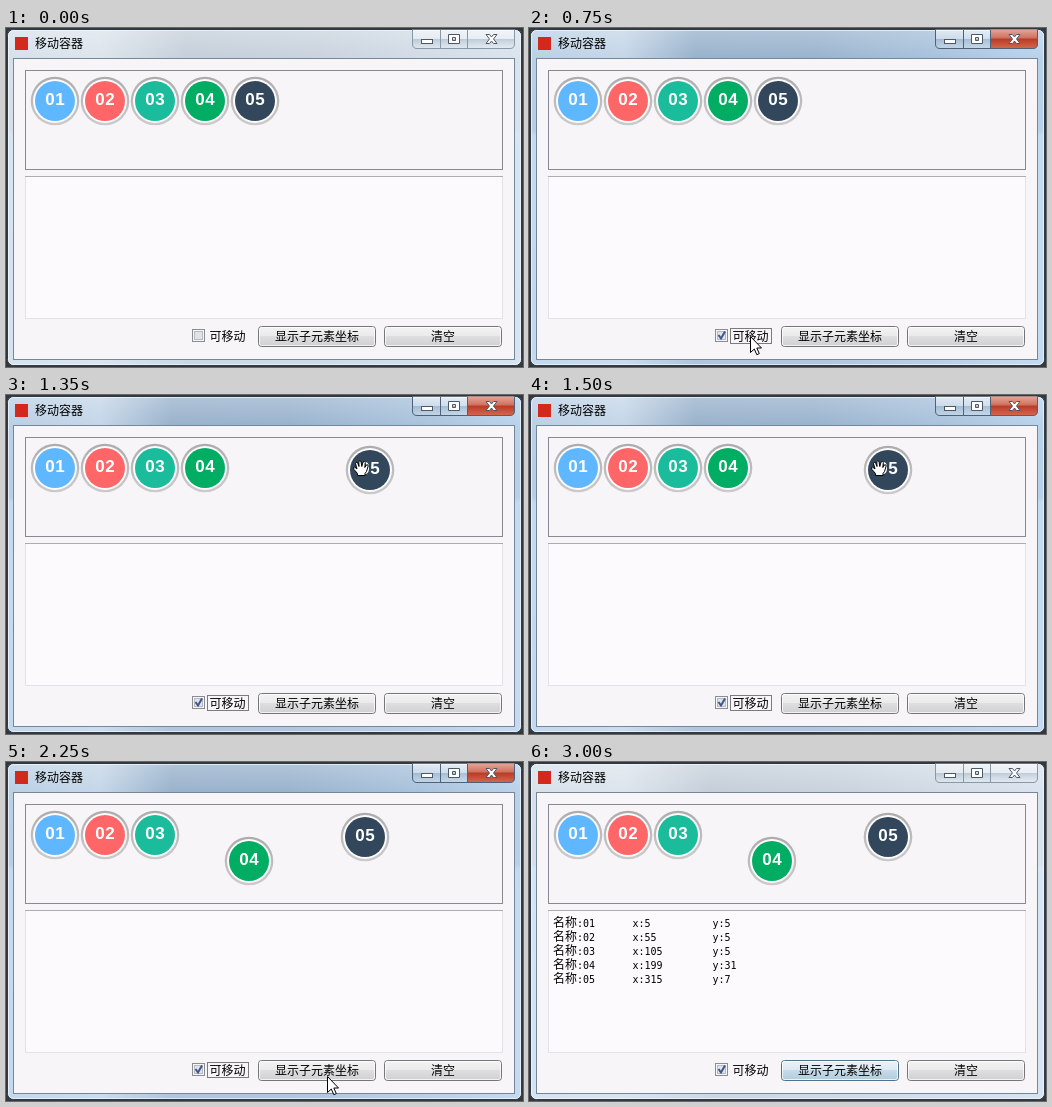
Animation, 517 px wide and 339 px high, one loop 3.15 s. Source, as an HTML page:

```html
<!DOCTYPE html>
<html lang="zh-CN">
<head>
<meta charset="utf-8">
<title>移动容器</title>
<style>
  html, body { margin: 0; width: 100%; height: 100%; overflow: hidden; background: #34383d; }
  svg { display: block; width: 517px; height: 339px; }
  text { font: 12px "Noto Sans CJK SC", "Noto Sans CJK", sans-serif; fill: #000; }
  .mono { font: 10px "DejaVu Sans Mono", monospace; }
  .ball text { font: bold 17px "Liberation Sans", Arial, sans-serif; letter-spacing: .5px; fill: #fff; }
  .mid { text-anchor: middle; }
</style>
</head>
<body>
<svg viewBox="0 0 517 339">
  <defs>
    <linearGradient id="activeGlass">
      <stop offset="0" stop-color="#b3cbe2"/><stop offset=".18" stop-color="#bfd2e5"/>
      <stop offset=".32" stop-color="#8eaac6"/><stop offset=".55" stop-color="#8fabc8"/>
      <stop offset=".8" stop-color="#a0bcd8"/><stop offset="1" stop-color="#b3cfe9"/>
    </linearGradient>
    <linearGradient id="idleGlass">
      <stop offset="0" stop-color="#d3dde8"/><stop offset=".18" stop-color="#d9e2ea"/>
      <stop offset=".35" stop-color="#bfcad5"/><stop offset=".6" stop-color="#c4cfda"/>
      <stop offset="1" stop-color="#d6e1ec"/>
    </linearGradient>
    <linearGradient id="sheen" x2="0" y2="1">
      <stop offset="0" stop-color="#fff" stop-opacity=".3"/><stop offset=".09" stop-color="#fff" stop-opacity=".08"/>
      <stop offset=".3" stop-color="#fff" stop-opacity=".05"/><stop offset=".32" stop-color="#d8ecff" stop-opacity=".45"/>
      <stop offset="1" stop-color="#d8e8fa" stop-opacity=".45"/>
    </linearGradient>
    <linearGradient id="face" x2="0" y2="1">
      <stop offset="0" stop-color="#f4f3f4"/><stop offset=".48" stop-color="#ebeaeb"/>
      <stop offset=".5" stop-color="#dedddf"/><stop offset="1" stop-color="#d0cfd1"/>
    </linearGradient>
    <linearGradient id="hotFace" x2="0" y2="1">
      <stop offset="0" stop-color="#e9f2f8"/><stop offset=".48" stop-color="#dce9f2"/>
      <stop offset=".5" stop-color="#c6dbe8"/><stop offset="1" stop-color="#b0cbdc"/>
    </linearGradient>
    <linearGradient id="closeFace" x2="0" y2="1">
      <stop offset="0" stop-color="#e5a698"/><stop offset=".45" stop-color="#d0705f"/>
      <stop offset=".5" stop-color="#b93b27"/><stop offset="1" stop-color="#d4694c"/>
    </linearGradient>
    <linearGradient id="capFace" x2="0" y2="1">
      <stop offset="0" stop-color="#fff" stop-opacity=".55"/><stop offset=".48" stop-color="#fff" stop-opacity=".3"/>
      <stop offset=".5" stop-color="#6f8ba8" stop-opacity=".3"/><stop offset="1" stop-color="#fff" stop-opacity=".2"/>
    </linearGradient>
    <linearGradient id="rim" x2="0" y2="1">
      <stop offset="0" stop-color="#acacac"/><stop offset="1" stop-color="#cbcbcb"/>
    </linearGradient>
  </defs>

  <rect id="frame" x="1.5" y="1.5" width="514" height="336" rx="6" stroke="#303b47"/>
  <rect x="2.5" y="2.5" width="512" height="334" rx="5" fill="url(#sheen)" stroke="#f2f8fd" stroke-opacity=".75"/>
  <rect x="7.5" y="30.5" width="501" height="301" fill="#f8f5f9" stroke="#75879a"/>
  <rect x="9" y="9" width="13" height="13" fill="#d3291c"/>
  <text x="29" y="20">移动容器</text>

  <g id="caption">
    <path d="M406.5 1.5V16Q406.5 20.5 411 20.5H504Q508.5 20.5 508.5 16V1.5Z" fill="url(#capFace)"/>
    <path id="close" d="M461.5 1.5V20.5H504Q508.5 20.5 508.5 16V1.5Z" fill="url(#closeFace)"/>
    <path d="M406.5 1.5V16Q406.5 20.5 411 20.5H504Q508.5 20.5 508.5 16V1.5M434.5 2V20M461.5 2V20" fill="none" id="capLines"/>
    <g fill="#fff" stroke="#4c5867">
      <rect x="415.5" y="11.5" width="11" height="4"/>
      <path fill-rule="evenodd" d="M442.5 6.5H453.5V15.5H442.5ZM446.5 9.5V12.5H449.5V9.5Z"/>
      <path d="M480 6.5H483.5L485.5 9L487.5 6.5H491L487.5 11L491 15.5H487.5L485.5 13L483.5 15.5H480L483.5 11Z"/>
    </g>
  </g>

  <rect x="19.5" y="42.5" width="477" height="99" fill="none" stroke="#878a95"/>
  <rect x="19.5" y="148.5" width="477" height="142" fill="#fcfafd" stroke="#e2e3ea"/>
  <path d="M19 148.5H497" stroke="#abadb3"/>

  <g id="output"></g>
  <g id="balls"></g>

  <rect x="186.5" y="301.5" width="12" height="12" fill="#f6f5f7" stroke="#8c8d91"/>
  <rect x="188.5" y="303.5" width="8" height="8" fill="#e1e3e7" stroke="#b6bbc1"/>
  <path id="tick" d="M189.5 307L192 310.5L196 303.5" fill="none" stroke="#3f5590" stroke-width="2"/>
  <text x="203.5" y="313">可移动</text>
  <rect id="focus" x="201.5" y="300.5" width="41" height="15" fill="none" stroke="#000" stroke-dasharray="1 1"/>

  <rect id="show" x="252.5" y="298.5" width="117" height="20" rx="3"/>
  <rect x="253.5" y="299.5" width="115" height="18" rx="2" fill="none" stroke="#fff" stroke-opacity=".75"/>
  <text x="311" y="313" class="mid">显示子元素坐标</text>
  <rect x="378.5" y="298.5" width="117" height="20" rx="3" fill="url(#face)" stroke="#76767a"/>
  <rect x="379.5" y="299.5" width="115" height="18" rx="2" fill="none" stroke="#fff" stroke-opacity=".75"/>
  <text x="437" y="313" class="mid">清空</text>

  <path class="cursor" id="arrow" d="M.5 .5V16.5L4.3 13L6.8 18.7L9.3 17.6L6.8 12H11.5Z" fill="#fff" stroke="#000"/>
  <path class="cursor" id="beam" d="M-3 -7.5H-1L0 -6.5L1 -7.5H3M0 -7V7M-3 7.5H-1L0 6.5L1 7.5H3" fill="none" stroke="#000"/>
  <path class="cursor" id="hand" transform-origin="0 0" fill="#fff" stroke="#000" stroke-linejoin="round"
    d="M-3.5 7.5V5.5L-7 1.5Q-8 -.5 -6.5 -1L-4 1L-5.5 -4.5Q-5 -6.5 -3.5 -5.5L-2 -1.5L-2.2 -6.5Q-1 -8 0 -6.5L.8 -1.5L2 -6Q3.5 -7.2 4.3 -5.5L3.8 -.5L5.3 -3Q7 -4 7.2 -2L5.5 3.5L4 5.5V7.5Z"/>
</svg>
<script>
const STEP = 150, STEPS = 21;
const NS = "http://www.w3.org/2000/svg";
const $ = id => document.getElementById(id);

function add(parent, tag, attrs, text = "") {
  const el = document.createElementNS(NS, tag);
  for (const [key, value] of Object.entries(attrs)) el.setAttribute(key, value);
  el.textContent = text;
  return parent.appendChild(el);
}

const place = (el, x, y) => el.setAttribute("transform", `translate(${x} ${y})`);
const show = (el, on) => { el.style.visibility = on ? "visible" : "hidden"; };

const balls = ["#5fb8ff", "#ff6668", "#1abc9c", "#00ad62", "#32475b"].map((color, i) => {
  const g = add($("balls"), "g", { class: "ball" });
  add(g, "circle", { r: 24.3, fill: "url(#rim)" });
  add(g, "circle", { r: 22, fill: "#fdfbfd" });
  add(g, "circle", { r: 20, fill: color });
  add(g, "text", { x: 0.3, y: 4.3, class: "mid" }, "0" + (i + 1));
  place(g, 49 + 50 * i, 73);
  return g;
});

[[5, 5], [55, 5], [105, 5], [199, 31], [315, 7]].forEach(([x, y], i) => {
  const row = 165 + 14 * i;
  add($("output"), "text", { x: 24, y: row }, "名称");
  [[48, ":0" + (i + 1)], [103.5, "x:" + x], [183.5, "y:" + y]].forEach(([left, text]) =>
    add($("output"), "text", { x: left, y: row, class: "mono" }, text));
});

// Each row holds until the next: step, then position.
const ball4 = [[0, 199, 73], [13, 222, 86], [14, 243, 99]];
const ball5 = [[0, 249, 73], [8, 300, 74], [9, 364, 75], [10, 359, 75]];
const cursor = [
  [0], [1, "beam", 330.5, 200], [2, "beam", 256.5, 252],
  [3, "arrow", 224, 297], [4, "arrow", 221, 308],
  [6, "arrow", 231, 190], [7, "arrow", 237, 81],
  [8, "hand", 291, 72], [9, "hand", 355, 73], [10, "hand", 350, 73],
  [11, "arrow", 285, 77], [12, "hand", 212, 80], [13, "hand", 235, 93], [14, "hand", 256, 106],
  [15, "arrow", 321, 314], [18]
];
const rowAt = (rows, step) => rows.filter(row => row[0] <= step).pop().slice(1);

function draw(step) {
  const active = step >= 5 && step < 18;
  const printed = step >= 16;

  $("frame").setAttribute("fill", `url(#${active ? "activeGlass" : "idleGlass"})`);
  $("capLines").setAttribute("stroke", active ? "#4d6178" : "#8998a8");
  show($("close"), active);
  show($("tick"), step >= 5);
  show($("focus"), active && !printed);
  show($("output"), printed);
  $("show").setAttribute("fill", `url(#${printed ? "hotFace" : "face"})`);
  $("show").setAttribute("stroke", printed ? "#50748c" : "#76767a");

  place(balls[3], ...rowAt(ball4, step));
  place(balls[4], ...rowAt(ball5, step));

  const [kind, x, y] = rowAt(cursor, step);
  for (const el of document.querySelectorAll(".cursor")) {
    show(el, el.id === kind);
    if (el.id === kind) place(el, x, y);
  }
}

const start = performance.now();
let last = -1;
function tick() {
  const step = Math.floor((performance.now() - start) / STEP) % STEPS;
  if (step !== last) draw(last = step);
  requestAnimationFrame(tick);
}
tick();
</script>
</body>
</html>
```
